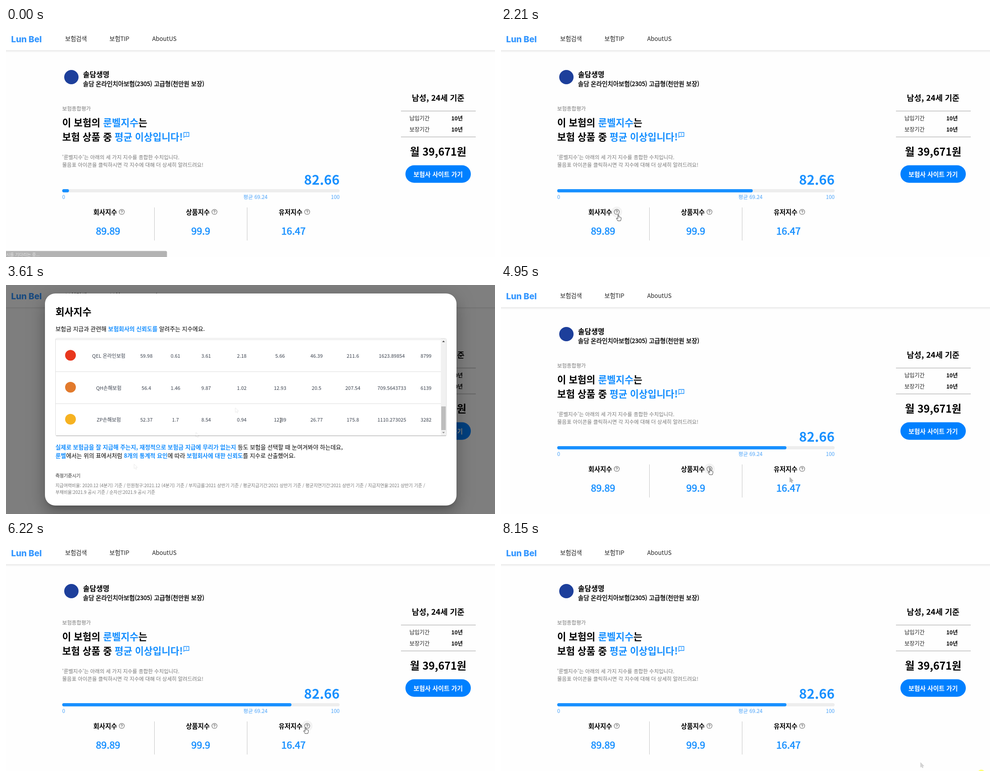
Recreate the animation shown at these times as an HTML page. Size 1092 by 513 pixels, loop 8230 ms.

```html
<!DOCTYPE html>
<html lang="ko">
<head>
<meta charset="utf-8">
<title>보험 지수</title>
<style>
  html, body { margin: 0; width: 100%; height: 100%; overflow: hidden; background: #fefefe; }
  svg { display: block; width: 100vw; height: 100vh; }
  text { font-family: "Noto Sans CJK KR", "Noto Sans CJK", "Noto Sans", sans-serif; }
  .logo { font-family: Inter, sans-serif; font-weight: 800; }
  .header { filter: drop-shadow(0 1px 2px rgba(0, 0, 0, .16)); }
</style>
</head>
<body>
<svg id="stage" viewBox="0 0 1092 513">
  <defs>
    <clipPath id="tableClip"><rect x="111" y="120" width="860" height="217"/></clipPath>
    <path id="arrow" d="M0 0V10.5L2.4 8.3L4 12L5.7 11.2L4.1 7.7H7.4Z" stroke-width=".9"/>
    <path id="hand" d="M-1 1Q0-.8 1 1V5.2Q2 4.3 2.9 5.6Q4 4.9 4.7 6.2Q6.2 5.6 6.2 7.4V10.5Q5.7 12 5 14H-1.2Q-2.5 11.5-4.2 9.2Q-4.6 7.3-3 7.8L-1 9.3Z" stroke-width=".9"/>
    <path id="ibeam" d="M-2-5H-.4L0-4.5L.4-5H2M0-4.5V4.5M-2 5H-.4L0 4.5L.4 5H2" stroke-width=".9"/>
  </defs>
</svg>
<script>
const LOOP = 8230;
const BLUE = '#1890ff';
const GREY = '#777';
const stage = document.getElementById('stage');

function add(parent, tag, attrs = {}) {
  const el = document.createElementNS('http://www.w3.org/2000/svg', tag);
  for (const key in attrs) el.setAttribute(key, attrs[key]);
  return parent.appendChild(el);
}

const rect = (parent, x, y, width, height, fill, rx = 0, more = {}) =>
  add(parent, 'rect', { x, y, width, height, fill, rx, ...more });

const circle = (parent, cx, cy, r, fill, more = {}) =>
  add(parent, 'circle', { cx, cy, r, fill, ...more });

const line = (parent, d, stroke, width = 1) =>
  add(parent, 'path', { d, stroke, 'stroke-width': width, fill: 'none' });

// Parts between asterisks become blue and bold; cy is the middle of the line.
// Weight 500 is drawn as regular with a thin outline.
function label(parent, x, cy, size, content, { fill = '#000', weight = 400, anchor = 'start', cls = '' } = {}) {
  const el = add(parent, 'text', {
    x, y: cy + size * .36, 'font-size': size, 'font-weight': weight === 500 ? 400 : weight,
    'text-anchor': anchor, fill, class: cls
  });
  if (weight === 500) {
    el.setAttribute('stroke', fill);
    el.setAttribute('stroke-width', size * .032);
  }
  content.split('*').forEach((part, i) => {
    if (!part) return;
    const span = add(el, 'tspan', i % 2 ? { fill: BLUE, 'font-weight': 700 } : {});
    span.textContent = part;
  });
  return el;
}

// points: [time, value] pairs, moved between linearly.
function track(el, points, style) {
  const first = points[0], last = points[points.length - 1];
  const frames = [[0, first[1]], ...points, [LOOP, last[1]]]
    .map(([time, value]) => ({ offset: time / LOOP, ...style(value) }));
  el.animate(frames, { duration: LOOP, iterations: Infinity });
}

const opacity = value => ({ opacity: value });
const shiftY = value => ({ transform: `translate(0px, ${value}px)` });
const spans = list => list.flatMap(([from, to]) => [[from, 0], [from, 1], [to, 1], [to, 0]]);
const showDuring = (el, ...list) => track(el, spans(list), opacity);

function drawHeader() {
  rect(stage, -10, -10, 1112, 60, '#fff', 0, { class: 'header' });
  label(stage, 11.5, 25, 19, 'Lun Bel', { fill: '#3396ff', cls: 'logo' });
  [[132, '보험검색'], [231, '보험TIP'], [326.5, 'AboutUS']]
    .forEach(([x, name]) => label(stage, x, 24, 13.2, name, { fill: '#222' }));
}

function drawSummary() {
  const bold = { weight: 700 };
  circle(stage, 146, 110, 16, '#1d3f9b');
  label(stage, 172, 104, 16, '솔담생명', bold);
  label(stage, 172, 125.5, 13.5, '솔담 온라인치아보험(2305) 고급형(천만원 보장)', { weight: 500 });
  label(stage, 125.5, 180.5, 11.6, '보험종합평가', { fill: GREY });
  label(stage, 125.5, 212, 21.5, '이 보험의 *룬벨지수*는', bold);
  label(stage, 125.5, 244, 21.5, '보험 상품 중 *평균 이상입니다!*', bold);
  line(stage, 'M397 245V234H408.5V243H399.5Z', BLUE, 1.3);
  line(stage, 'M402.8 236V239M402.8 240V241.3', BLUE, 1.3);
  label(stage, 125.5, 290, 11.5, "'룬벨지수'는 아래의 세 가지 지수를 종합한 수치입니다.", { fill: GREY });
  label(stage, 125.5, 307, 11.5, '물음표 아이콘을 클릭하시면 각 지수에 대해 더 상세히 알려드려요!', { fill: GREY });
}

function drawScore() {
  label(stage, 745, 340, 29.6, '82.66', { fill: BLUE, weight: 700, anchor: 'end' });
  rect(stage, 125.5, 361, 619.5, 7.2, '#ededed', 3.6);
  const fill = rect(stage, 125.5, 361, 15, 7.2, BLUE, 3.6);
  track(fill, [[0, 15], [880, 163], [2210, 436.5], [2560, 512]], value => ({ width: `${value}px` }));
  label(stage, 125.5, 379, 11.7, '0', { fill: '#4aa3fa' });
  label(stage, 557, 379, 11.7, '평균 69.24', { fill: '#4aa3fa', anchor: 'middle' });
  label(stage, 745, 379, 11.7, '100', { fill: '#4aa3fa', anchor: 'end' });

  const hovers = [[1950, 2570], [4900, 5200], [6150, 6450]];
  [['회사지수', '89.89'], ['상품지수', '99.9'], ['유저지수', '16.47']].forEach(([name, value], i) => {
    const left = 125 + i * 207;
    showDuring(circle(stage, left + 133.5, 412, 12, '#f3f3f3'), hovers[i]);
    label(stage, left + 70, 413, 14.4, name, { weight: 700 });
    circle(stage, left + 133.5, 412, 5.7, 'none', { stroke: '#666', 'stroke-width': 1.1 });
    line(stage, `M${left + 131.7} 410.8Q${left + 131.9} 408.9 ${left + 133.5} 408.9T${left + 135.2} 410.6Q${left + 135} 411.6 ${left + 133.6} 412.4V413.2M${left + 133.6} 414.2V415.4`, '#666', 1.1);
    label(stage, left + 103, 455, 21.8, value, { fill: BLUE, weight: 500, anchor: 'middle' });
    if (i) line(stage, `M${left - .5} 402V476`, '#c6c6c6');
  });
}

function drawPrice() {
  const middle = { weight: 700, anchor: 'middle' };
  label(stage, 965, 156.5, 17.6, '남성, 24세 기준', middle);
  line(stage, 'M882 186H1049M882 244H1049', '#bdbdbd', 1.3);
  [['납입기간', 203], ['보장기간', 228]].forEach(([name, y]) => {
    label(stage, 901, y, 12.2, name, { fill: '#222' });
    label(stage, 1020, y, 12.2, '10년', { weight: 700, anchor: 'end' });
  });
  label(stage, 965, 277.5, 23.4, '월 39,671원', middle);
  rect(stage, 892, 307.5, 146, 39.3, '#0080ff', 19.6);
  label(stage, 965, 328, 13.9, '보험사 사이트 가기', { ...middle, fill: '#fff' });
}

function drawStatus() {
  const status = add(stage, 'g');
  rect(status, -5, 499.5, 364.5, 20, '#b3b3b3', 3);
  label(status, 0, 507.5, 9.6, '시를 기다리는 중...', { fill: '#e2e2e2' });
  track(status, [[0, 1], [70, 1], [260, 0]], opacity);
}

function addModal(x, y, width, height, title, [open, opened, close, closed]) {
  const fade = delay => [[open, 0], [opened, 1], [close + delay, 1], [closed + delay, 0]];
  const shade = rect(stage, 0, 0, 1092, 513, '#000', 0, { 'fill-opacity': .5 });
  const panel = add(stage, 'g');
  // Layers of one soft shadow: drop, blur, spread, strength.
  [[9, 6, -6, .2], [20, 16, 2.5, .14], [7.5, 19, 6.5, .12]].forEach(([drop, blur, spread, strength]) =>
    rect(panel, x - spread, y + drop - spread, width + 2 * spread, height + 2 * spread, '#000', 23 + spread,
      { 'fill-opacity': strength, style: `filter: blur(${blur}px)` }));
  rect(panel, x, y, width, height, '#fff', 23);
  label(panel, x + 23.5, y + 41, 21.8, title, { weight: 700 });
  track(shade, fade(30), opacity);
  track(panel, fade(0), opacity);
  return panel;
}

function seeded(seed) {
  return () => (seed = seed * 16807 % 2147483647) / 2147483647;
}

function tableRows() {
  const random = seeded(42);
  const names = ['솔담생명', '벼리온생명', '도래샘손해보험', '해든솔생명', '물빛결생명', '아람뜰생명', '여울담손해보험'];
  const ranges = [.8, 9, 2, 12, 40, 220];
  const rows = names.map((name, i) => [
    `hsl(${i * 50 + 215} 65% 45%)`, name, (89.89 - i * 4.1).toFixed(2),
    ...ranges.map(range => (range * (.4 + random() * .6)).toFixed(2)),
    (900 + random() * 900).toFixed(5), Math.round(3000 + random() * 9000)
  ]);
  return [
    ['', '회사명', '지수', '부지급률', '지급기간', '지연기간', '지연율', '민원청구', '여력비율', '부채비율', '순자산'],
    ...rows,
    ['#e8371d', 'QEL 온라인보험', 59.98, .61, 3.61, 2.18, 5.66, 46.39, 211.6, 1623.89854, 8799],
    ['#e27a2c', 'QH손해보험', 56.4, 1.46, 9.87, 1.02, 12.93, 20.5, 207.54, 709.5643733, 6139],
    ['#f6b221', 'ZP손해보험', 52.37, 1.7, 8.54, .94, 12.89, 26.77, 175.8, '1110.273025', 3282]
  ];
}

function drawTable(panel) {
  const columns = [144, 229.5, 313.5, 378.5, 447, 526.5, 612, 693.5, 774.5, 861.5, 938];
  const rowHeight = 71.7, bottom = 337.5, distance = 569;
  const scroll = [[2900, 0], [3210, .52], [3410, .52], [3600, 1]];
  const scaled = (from, to) => scroll.map(([time, part]) => [time, from + (to - from) * part]);

  rect(panel, 110.5, 119.5, 873, 218.5, '#fff', 3, { stroke: '#dedede' });
  const frame = add(panel, 'g', { 'clip-path': 'url(#tableClip)' });
  const body = add(frame, 'g');
  const rows = tableRows();
  rows.forEach((cells, i) => {
    const top = bottom - rowHeight * (rows.length - i);
    line(body, `M111 ${top}H971`, '#dcdcdc');
    cells.forEach((cell, column) => {
      if (column) {
        label(body, columns[column], top + 36.5, 11, String(cell),
          { fill: '#3d4450', weight: i ? 400 : 700, anchor: 'middle' });
      } else if (cell) {
        circle(body, columns[0], top + 35, 12, cell);
      }
    });
  });
  track(body, scaled(distance, 0), shiftY);

  line(panel, 'M112 337.7H983', '#b9b9b9', 1.2);
  rect(panel, 971, 120, 12, 217, '#f1f1f1');
  track(rect(panel, 972, 272, 10, 53, '#bdbdbd'), scaled(-140, 0), shiftY);
  add(panel, 'path', { d: 'M974 128H980L977 124.5Z', fill: '#555' });
  add(panel, 'path', { d: 'M974 329H980L977 332.5Z', fill: '#999' });
}

function drawCompanyModal() {
  const panel = addModal(87, 19, 919, 475, '회사지수', [2340, 2570, 4270, 4470]);
  label(panel, 110.5, 98, 12.9, '보험금 지급과 관련해 *보험회사의 신뢰도를* 알려주는 지수에요.');
  drawTable(panel);
  label(panel, 110.5, 363.5, 12.87, '*실제로 보험금을 잘 지급해 주는지, 재정적으로 보험금 지급에 무리가 없는지* 등도 보험을 선택할 때 눈여겨봐야 하는데요,');
  label(panel, 110.5, 382, 12.87, '*룬벨*에서는 위의 표에서처럼 *8개의 통계적 요인*에 따라 *보험회사에 대한 신뢰도*를 지수로 산출했어요.');
  label(panel, 110.5, 427, 10.1, '측정기준시기', { fill: '#666', weight: 500 });
  label(panel, 110.5, 449, 9.9, '지급여력비율: 2020.12 (4분기) 기준 / 민원청구:2021.12 (4분기) 기준 / 부지급률:2021 상반기 기준 / 평균지급기간:2021 상반기 기준 / 평균지연기간:2021 상반기 기준 / 지급지연율:2021 상반기 기준 /', { fill: GREY });
  label(panel, 110.5, 464.5, 9.9, '부채비율:2021.9 공시 기준 / 순자산:2021.9 공시 기준', { fill: GREY });
  [[286, 401], [424, 330], [512, 275]].forEach(([x, y]) => ghost(panel, x, y, '#fff', .13, 2800, 4470));
}

function drawShortModal(title, summary, formula, source, times) {
  const panel = addModal(301.5, 163, 490, 186.5, title, times);
  label(panel, 325, 242.5, 12.95, summary);
  label(panel, 325, 272.5, 11.6, '*지수 계산법*');
  label(panel, 325, 290.5, 12.1, formula, { fill: GREY });
  label(panel, 325, 319.5, 10.75, source, { fill: GREY });
}

function ghost(parent, x, y, fill, strength, from, to) {
  const el = add(parent, 'g');
  add(el, 'use', { href: '#arrow', x, y, fill, stroke: '#555', opacity: strength });
  showDuring(el, [from, to]);
}

function drawPointer() {
  const pointer = add(stage, 'g');
  const phases = {
    arrow: [[600, 1950], [2480, 2900], [3700, 4900], [5330, 6150], [6560, 7890]],
    hand: [[1950, 2480], [4900, 5330], [6150, 6560]],
    ibeam: [[2900, 3700]]
  };
  for (const shape in phases) {
    const fill = shape === 'ibeam' ? 'none' : '#fff';
    showDuring(add(pointer, 'use', { href: `#${shape}`, fill, stroke: '#2a2a2a' }), ...phases[shape]);
  }
  const path = [
    [600, 655, 178], [1300, 420, 250], [1740, 290, 392], [2000, 262, 418], [2450, 262, 418],
    [2560, 287, 401], [2680, 424, 330], [2780, 512, 275], [2950, 613, 303], [3700, 613, 303],
    [4150, 1031, 450], [4480, 1031, 450], [4700, 645, 431], [4900, 467, 411], [5300, 467, 411],
    [5560, 760, 440], [6040, 760, 440], [6180, 669, 415], [6540, 669, 415], [6950, 760, 417],
    [7580, 760, 417], [7800, 937, 494], [7890, 1060, 516]
  ];
  track(pointer, path.map(([time, ...point]) => [time, point]),
    ([x, y]) => ({ transform: `translate(${x}px, ${y}px)` }));
}

drawHeader();
drawSummary();
drawScore();
drawPrice();
drawStatus();
ghost(stage, 645, 431, '#777', .5, 4720, 5200);
ghost(stage, 937, 494, '#777', .3, 7820, LOOP);
drawCompanyModal();
drawShortModal('상품지수', '보험 상품의 *보장 내용이 얼마나 좋은지* 알려주는 지수예요.',
  '(해당 보험상품의 보장 금액 / 해당 보험상품의 월 보험료)',
  '데이터 레퍼런스 : 각 보험사에서 공시한 상품 정보', [5090, 5310, 5660, 5860]);
drawShortModal('유저지수', '같은 연령, 성별 유저들에게 *얼마나 선택받은 보험인지* 알려주는 지수예요.',
  '(해당 보험상품에 대한 20대 남성 가입자 수 / 모든 보험상품에 대한 20대 남성 가입자 수)',
  '데이터 레퍼런스 : 나래보험통계원에서 제공한 모의금융DB', [6340, 6560, 7480, 7680]);
showDuring(circle(stage, 1072.5, 518.5, 8.5, '#ffff70'), [8090, LOOP]);
drawPointer();
</script>
</body>
</html>
```
